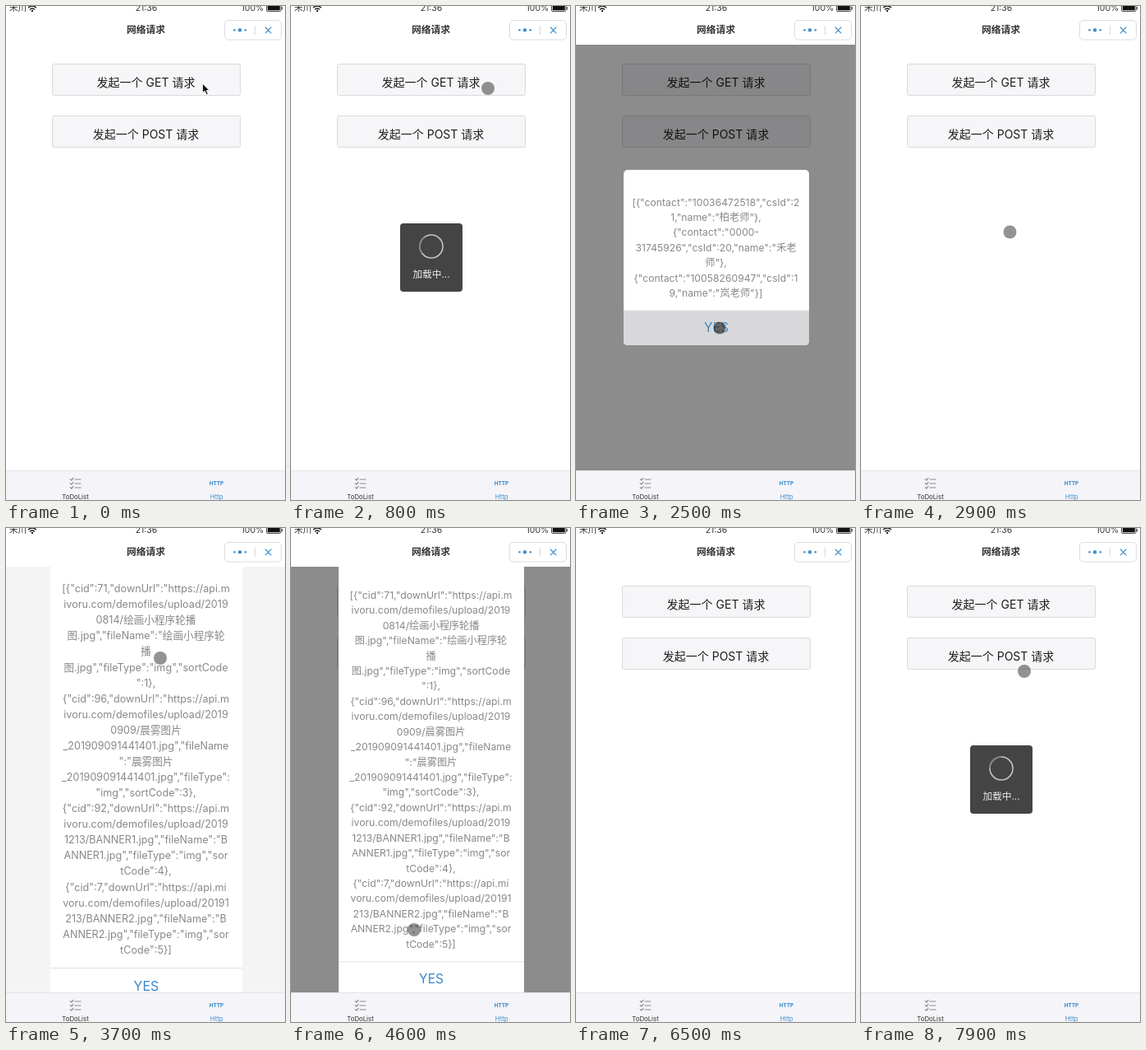
Write an HTML page that moves like this. It is 340x600 px and loops after 8 s.

```html
<!DOCTYPE html>
<html lang="zh">
<head>
<meta charset="utf-8">
<style>
  html, body { margin: 0; width: 100%; height: 100%; overflow: hidden; background: #fff; }
  svg { display: block; width: 340px; height: 600px; }
  text { font-family: Inter, "Noto Sans CJK SC", "Noto Sans CJK", sans-serif; text-anchor: middle; white-space: pre; }
  .blue { fill: #4290cb; }
  .line { fill: none; stroke-linecap: round; stroke-linejoin: round; }
  .button rect { fill: #f6f6f8; stroke: #dadadc; }
  .button text { font-size: 14px; fill: #1c1c1e; }
  .body { font-size: 12.2px; fill: #888; }
  .yes { font-size: 15.5px; fill: #3b88c9; }
  .status { font-size: 10.5px; fill: #333; }
  .tab { font-size: 7.8px; }
</style>
</head>
<body>
<svg viewBox="0 0 340 600">
  <rect width="340" height="600" fill="#fff"/>
  <g class="button">
    <rect x="56.5" y="70.5" width="229" height="38" rx="2"/>
    <text x="170.5" y="97.7">发起一个 GET 请求</text>
  </g>
  <g class="button">
    <rect x="56.5" y="133.5" width="229" height="38" rx="2"/>
    <text x="170.5" y="160.5">发起一个 POST 请求</text>
  </g>

  <rect id="shade" y="47" width="340" height="517" fill="#000"/>
  <g id="dialogs"></g>

  <g id="toast">
    <rect x="133" y="264" width="76" height="83" rx="4" fill="#444445"/>
    <circle cx="171" cy="292" r="14" fill="none" stroke="#c4c4c6" stroke-width="1.6"/>
    <path id="spinner" d="M157 292A14 14 0 0 1 171 278" fill="none" stroke="#7f8088" stroke-width="1.7"/>
    <text x="171" y="330" font-size="11.7" fill="#eee">加载中...</text>
  </g>

  <g id="header">
    <rect width="340" height="47" fill="#fff"/>
    <text class="status" x="14.5" y="6">禾川</text>
    <g class="line" stroke="#222" stroke-width="1.4">
      <path d="M27.5 1.8Q32 -2 36.5 1.8M29.4 4Q32 1.8 34.6 4"/>
      <circle cx="32" cy="6" r=".5"/>
    </g>
    <text class="status" x="171" y="6">21:36</text>
    <text class="status" x="300.5" y="6">100%</text>
    <rect x="317.5" y="-1.5" width="17.5" height="8" rx="1.5" fill="none" stroke="#222" stroke-width=".8"/>
    <rect x="318.8" y="-1" width="15" height="6.3" rx=".6" fill="#111"/>
    <path d="M336.3 1V4.5" stroke="#222"/>
    <text x="170.5" y="33.2" font-size="11.8" font-weight="700" fill="#333">网络请求</text>
    <rect x="266.5" y="17.5" width="69" height="23.5" rx="4.5" fill="#fff" stroke="#dcdcde"/>
    <g class="blue">
      <circle cx="278.5" cy="29.3" r="1.3"/>
      <circle cx="285" cy="29.3" r="2.2"/>
      <circle cx="291.8" cy="29.3" r="1.3"/>
    </g>
    <path d="M303.5 24V35" stroke="#dadadc"/>
    <path d="M316.2 26L323 32.8M323 26L316.2 32.8" class="line" stroke="#4290cb" stroke-width="1.2"/>
  </g>

  <g id="tabs">
    <rect y="564" width="340" height="36" fill="#f4f4f9"/>
    <path d="M0 564.5H340" stroke="#e3e3e8"/>
    <g class="line" stroke="#8b8b8f" stroke-width="1.2">
      <path d="M84 575H91M84 580H91M84 585H91"/>
      <path d="M78.3 574.6L79.8 576L82 573.4M78.3 579.6L79.8 581L82 578.4M78.3 584.6L79.8 586L82 583.4"/>
    </g>
    <text class="tab" x="84.5" y="598.8" fill="#333">ToDoList</text>
    <text class="blue" x="256.5" y="582" font-size="6.4" font-weight="800">HTTP</text>
    <text class="tab blue" x="256.7" y="598.8">Http</text>
  </g>

  <circle id="touch" r="8"/>
  <path id="arrow" d="M239.5 94.2V105.6L242.2 103.2L244.2 107.6L246.2 106.7L244.3 102.5H247.8Z" fill="#111" stroke="#fff" stroke-width=".8"/>
</svg>
<script>
const LOOP = 8000, STEP = 100;
const CENTER = { x: 171, y: 305.6 };
const LINE = 18.43, WIDTH = 226, ROW = 42, PAD = 42;
const $ = id => document.getElementById(id);
const clamp = v => Math.max(0, Math.min(1, v));

const contacts = [
  '[{"contact":"10036472518","csId":2', '1,"name":"柏老师"},', '{"contact":"0000-',
  '31745926","csId":20,"name":"禾老', '师"},',
  '{"contact":"10058260947","csId":1', '9,"name":"岚老师"}]'
];
const link = (id, open = '') => `${open}{"cid":${id},"downUrl":"https://api.m`;
const path = 'ivoru.com/demofiles/upload/2019';
const banner = 'jpg","fileType":"img","sor';
const files = [
  link(71, '['), path, '0814/绘画小程序轮播', '图.jpg","fileName":"绘画小程序轮', '播',
  '图.jpg","fileType":"img","sortCode', '":1},',
  link(96), path, '0909/晨雾图片', '_201909091441401.jpg","fileName', '":"晨雾图片',
  '_201909091441401.jpg","fileType":', '"img","sortCode":3},',
  link(92), path, '1213/BANNER1.jpg","fileName":"B', 'ANNER1.' + banner, 'tCode":4},',
  link(7) + 'i', 'voru.com/demofiles/upload/20191', '213/BANNER2.jpg","fileName":"B',
  'ANNER2.' + banner, 'tCode":5}]'
];

function add(parent, tag, attrs, text = '') {
  const node = document.createElementNS('http://www.w3.org/2000/svg', tag);
  for (const key in attrs) node.setAttribute(key, attrs[key]);
  node.textContent = text;
  return parent.appendChild(node);
}

// Coordinates are relative to the dialog centre, so it scales in place.
function makeDialog(lines, times) {
  const group = add($('dialogs'), 'g', {});
  const height = lines.length * LINE + PAD + ROW;
  const top = -height / 2, split = height / 2 - ROW, left = -WIDTH / 2;
  add(group, 'rect', { x: left, y: top, width: WIDTH, height, rx: 5, fill: '#fff' });
  lines.forEach((line, i) =>
    add(group, 'text', { class: 'body', x: -0.5, y: top + 43.4 + i * LINE }, line));
  const pressed = add(group, 'path', {
    d: `M${left} ${split}h${WIDTH}v${ROW - 5}q0 5 -5 5h${10 - WIDTH}q-5 0 -5 -5z`, fill: '#d8d8da'
  });
  add(group, 'path', { d: `M${left} ${split}h${WIDTH}`, stroke: '#e2e2e4' });
  add(group, 'text', { class: 'yes', x: 0, y: split + 26.2 }, 'YES');
  return { group, pressed, ...times };
}

const dialogs = [
  makeDialog(contacts, { open: 1340, press: 2400, close: 2500, end: 2700 }),
  makeDialog(files, { open: 3660, press: 5500, close: 5600, end: 5800 })
];
const toasts = [[500, 1400], [3300, 3700], [7700, LOOP]];
const bounce = [[0, 0.9], [0.1, 1.035], [0.4, 1.088], [0.65, 0.98], [1, 1]];
const moves = [
  [100, 240, 100], [1200, 240, 100], [1500, 240, 203], [2100, 175, 391], [2700, 175, 391],
  [3100, 188, 158], [3800, 188, 158], [4600, 150, 488], [5100, 172, 548], [5900, 172, 548],
  [6400, 172, 548], [6900, 322, 300], [7500, 199, 174], [LOOP, 199, 174]
];
const smooth = p => p * p * (3 - 2 * p);

function sample(keys, at, ease = p => p) {
  if (at <= keys[0][0]) return keys[0].slice(1);
  const i = keys.findIndex(key => key[0] >= at);
  const a = keys[i - 1], b = keys[i];
  const p = ease((at - a[0]) / (b[0] - a[0]));
  return a.slice(1).map((v, k) => v + (b[k + 1] - v) * p);
}

const show = (node, on) => node.setAttribute('visibility', on ? 'visible' : 'hidden');
const within = (t, from, to) => t >= from && t < to;

function render(t) {
  let shade = 0, pressing = false;
  for (const d of dialogs) {
    const opened = clamp((t - d.open) / 400);
    const fade = 1 - clamp((t - d.close) / (d.end - d.close));
    const on = within(t, d.open, d.end);
    const pressed = on && t >= d.press;
    if (on) {
      shade = 0.45 * opened * fade;
      pressing ||= pressed;
      const [scale] = sample(bounce, opened);
      d.group.setAttribute('transform', `translate(${CENTER.x} ${CENTER.y}) scale(${scale})`);
      d.group.setAttribute('opacity', fade);
    }
    show(d.group, on);
    show(d.pressed, pressed);
  }
  $('shade').setAttribute('opacity', shade);

  show($('toast'), toasts.some(([from, to]) => within(t, from, to)));
  $('spinner').setAttribute('transform', `rotate(${(t - 7900) * 0.36} 171 292)`);

  const [x, y] = sample(moves, t, smooth);
  const touch = $('touch');
  touch.setAttribute('cx', x);
  touch.setAttribute('cy', y);
  touch.setAttribute('fill', pressing ? 'rgba(40,40,40,.65)' : 'rgba(40,40,40,.5)');
  touch.setAttribute('stroke', pressing ? 'rgba(255,255,255,.6)' : 'none');
  show(touch, within(t, 100, 6400) || t >= 6900);
  show($('arrow'), t < 100);
}

const start = performance.now();
function tick() {
  const elapsed = (performance.now() - start) % LOOP;
  render(Math.floor(elapsed / STEP) * STEP);
  requestAnimationFrame(tick);
}
tick();
</script>
</body>
</html>
```
